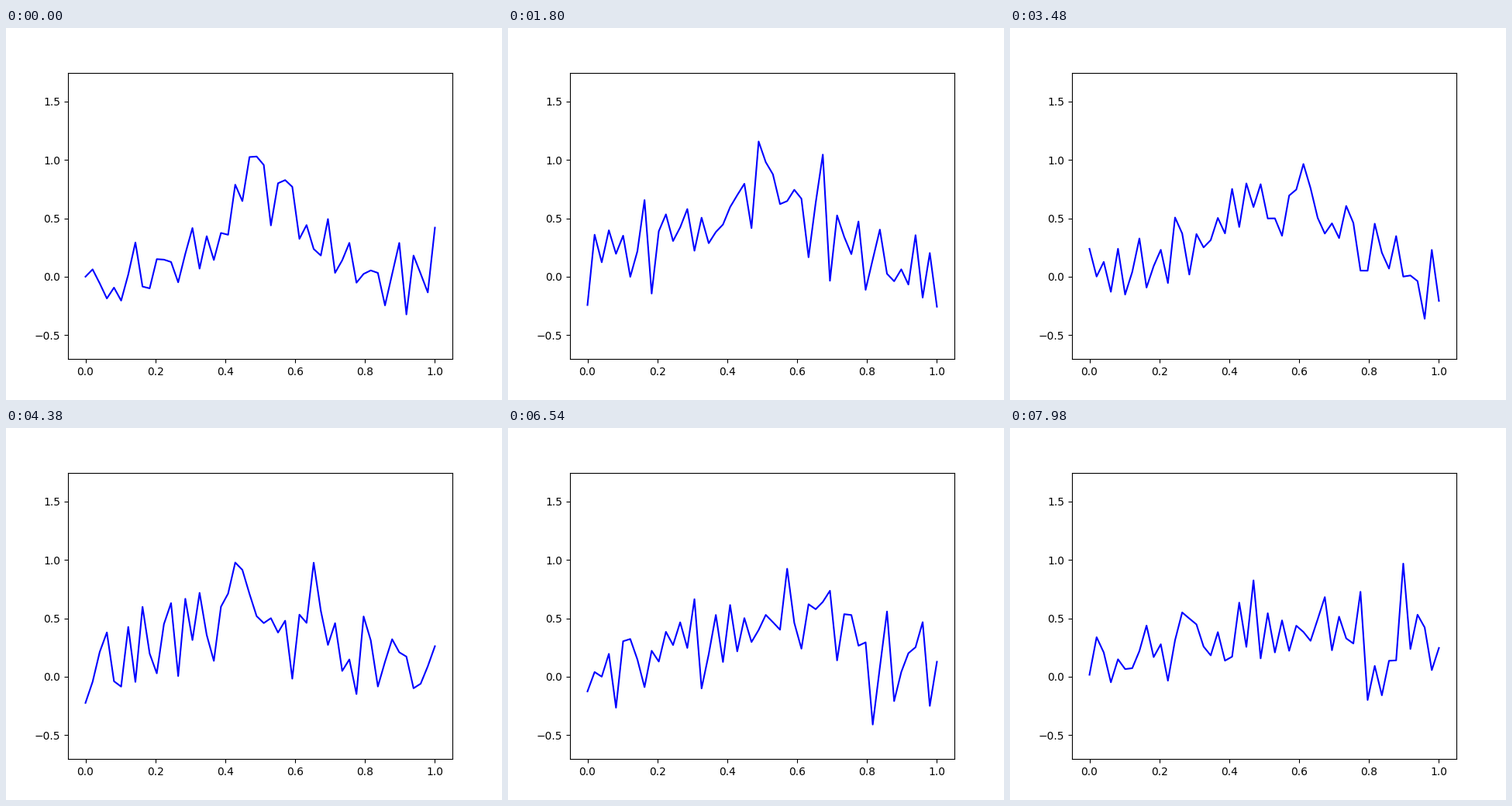
Write a matplotlib script that moves like this. It is 640x480 px and loops after 8000 ms.

```python
import numpy as np
import matplotlib.pyplot as plt
from matplotlib.animation import FuncAnimation

LOOP_MS = 8000
TICK_MS = 20
HOLD = 3          # ticks per noisy curve
TICKS = LOOP_MS // TICK_MS
STEPS = -(-TICKS // HOLD)
NOISE = 0.21
WIDTH = 0.12      # starting width of the bump
SPREAD = 35       # steps until its variance doubles

x = np.linspace(0, 1, 50)
rng = np.random.default_rng(7)


def bump(step):
    """Diffusing Gaussian with reflecting ends."""
    growth = 1 + step / SPREAD
    var = WIDTH ** 2 * growth
    images = sum(np.exp(-(x - c) ** 2 / (2 * var)) for c in (-0.5, 0.5, 1.5))
    return images / np.sqrt(growth)


curves = [bump(step) + rng.normal(0, NOISE, x.size) for step in range(STEPS)]

fig, ax = plt.subplots(figsize=(6.4, 4.8), dpi=100)
line, = ax.plot(x, curves[0], "b-")
ax.set_xlim(-0.05, 1.05)
ax.set_ylim(-0.7048, 1.7473)


def update(tick):
    line.set_ydata(curves[tick // HOLD])
    return line,


anim = FuncAnimation(fig, update, frames=TICKS, interval=TICK_MS,
                     repeat=True, repeat_delay=0, blit=True)
plt.show()
```
